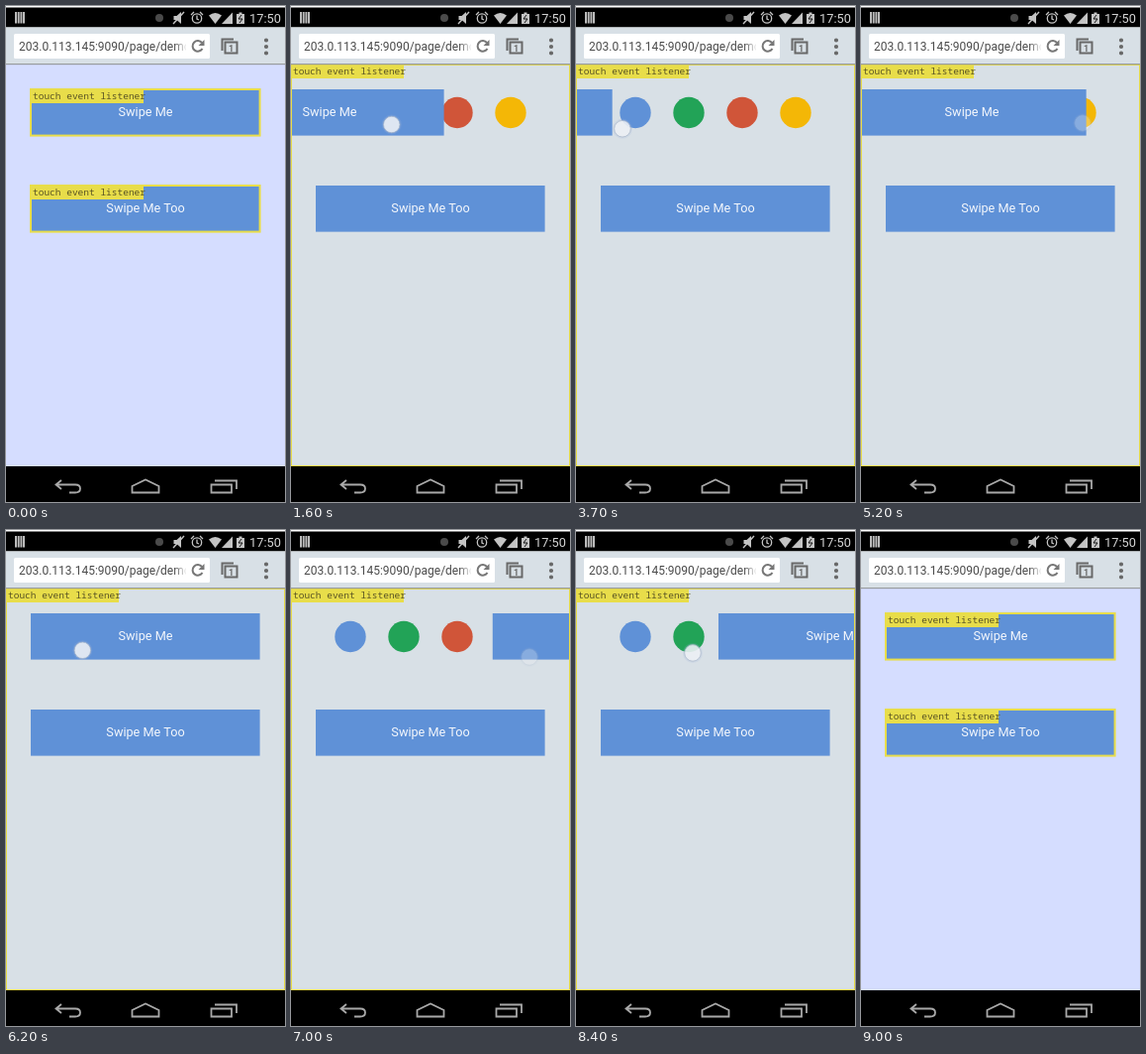
Recreate the animation shown at these times as an HTML page. Size 282 by 500 pixels, loop 9100 ms.

```html
<!DOCTYPE html>
<html lang="en">
<head>
<meta charset="utf-8">
<title>Swipe demo</title>
<style>
  html, body { margin: 0; width: 100%; height: 100%; overflow: hidden; background: #fff; }
  svg { display: block; width: 282px; height: 500px; }
  .ui { font-family: Roboto, sans-serif; }
  .button { font: 12.7px Roboto, sans-serif; fill: #f4f7fc; text-anchor: middle; }
  .label { font: 9.5px "Noto Sans Mono", monospace; fill: #5a5424; }
  .outline { fill: none; stroke: #e8dd4a; stroke-width: 2; }
  .nav { fill: none; stroke: #a9a9a9; stroke-width: 1.8; }
</style>
</head>
<body>
<svg viewBox="0 0 282 500">
  <defs>
    <clipPath id="page"><rect y="59" width="282" height="405"/></clipPath>
    <clipPath id="field"><rect x="8" y="28" width="174" height="25"/></clipPath>
    <linearGradient id="fade">
      <stop stop-color="#fff" stop-opacity="0"/><stop offset="1" stop-color="#fff"/>
    </linearGradient>
    <g id="listener">
      <rect width="114" height="14" fill="#e8dd4a"/>
      <text class="label" x="2" y="10">touch event listener</text>
    </g>
    <rect id="panel" x="25" width="231.6" height="46.6"/>
    <g id="highlight">
      <use href="#listener" x="25"/>
      <use href="#panel" class="outline"/>
    </g>
  </defs>

  <g clip-path="url(#page)">
    <rect id="backdrop" y="59" width="282" height="405"/>
    <g id="dots"></g>
    <g id="card">
      <use href="#panel" y="84" fill="#5f91d7"/>
      <use href="#highlight" y="84" class="idle"/>
      <text class="button" x="141" y="111.3">Swipe Me</text>
    </g>
    <use href="#panel" y="181" fill="#5f91d7"/>
    <use href="#highlight" y="181" class="idle"/>
    <text class="button" x="141" y="208.3">Swipe Me Too</text>
    <g id="active">
      <use href="#listener" y="59"/>
      <rect class="outline" x=".5" y="59.5" width="281" height="404" style="stroke-width:1"/>
    </g>
    <g id="finger">
      <circle r="10" fill="#9fb4dc" opacity=".2"/>
      <circle r="8.3" fill="#eff2f6" stroke="#aab6c8" stroke-width=".8" opacity=".87"/>
    </g>
  </g>

  <!-- status bar -->
  <rect y="1.5" width="282" height="20"/>
  <path d="M10 6v11.5M12.7 6v11.5M15.4 6v11.5M18 6v11.5" stroke="#bbb" stroke-width="2"/>
  <circle cx="155" cy="12" r="4" fill="#4a4a4a"/>
  <g fill="#c4c4c4">
    <path d="M169.5 10h3l4.5-4v12l-4.5-4h-3z"/>
    <path d="M169 18 180 6" stroke="#c4c4c4" stroke-width="1.4"/>
    <path d="M205 9.5Q211.5 4.5 218 9.5L211.5 18Z"/>
    <path d="M229 6.5V18H218z"/>
    <path d="M233 8h2.500V6.500h3V8H241v10h-8z"/>
  </g>
  <path d="M238 9 235 13h4l-3 4" fill="none" stroke="#111"/>
  <g fill="none" stroke="#c4c4c4" stroke-width="1.3">
    <circle cx="193" cy="12.5" r="4.7"/>
    <path d="M193 9.500v3.500l2 1M187 9l3-3M199 9l-3-3"/>
  </g>
  <text class="ui" x="246" y="17" font-size="12.8" fill="#d4d4d4">17:50</text>

  <!-- browser bar -->
  <rect y="21.5" width="282" height="37.5" fill="#d8e0e6"/>
  <rect y="58" width="282" height="1.2" fill="#999c9e"/>
  <rect x="8" y="28" width="198" height="25" rx="1.5" fill="#fff"/>
  <text class="ui" x="13" y="45" font-size="12" fill="#4a4a4a" clip-path="url(#field)">203.0.113.145:9090/page/demo</text>
  <rect x="170" y="30" width="13" height="21" fill="url(#fade)"/>
  <path d="M198 37A5.3 5.3 0 1 0 198.5 43" fill="none" stroke="#777" stroke-width="2"/>
  <path d="M200.5 34v6h-6z" fill="#777"/>
  <g fill="none" stroke="#686868" stroke-width="2">
    <path d="M218.5 45V33.5H230"/>
    <rect x="221.5" y="36.5" width="12" height="11"/>
  </g>
  <text class="ui" x="227.5" y="45.5" font-size="9" font-weight="700" text-anchor="middle" fill="#686868">1</text>
  <path d="M263 34.5v0M263 41v0M263 47.5v0" stroke="#686868" stroke-width="4.2" stroke-linecap="round"/>

  <!-- navigation bar -->
  <rect y="464" width="282" height="36"/>
  <g class="nav">
    <path d="M56 478l-5.5 4.5L56 487M51 482.5H70Q75 482.5 75 486.5T70 490.5H64"/>
    <path d="M127.5 490.5V484L141 477.5 154.5 484V490.5Z"/>
    <path d="M207.5 482.5H228V490.5H207.5ZM211 478.5H233V487"/>
  </g>
</svg>
<script>
const LOOP = 9100, STEP = 100, OPEN = 222;

// The finger drags from one point to another, then the card settles at rest
const swipes = [
  { start: 900, release: 2100, end: 2600, from: [229, 117], to: [25, 121], rest: -OPEN },
  { start: 3500, release: 5100, end: 5400, from: [39, 124], to: [224, 118], rest: 0 },
  { start: 6100, release: 6900, end: 7200, from: [70, 121], to: [241, 128], rest: OPEN },
  { start: 7900, release: 8800, end: 9000, from: [262, 121], to: [15, 126], rest: 0 }
];

const $ = id => document.getElementById(id);
const idle = document.querySelectorAll(".idle");
const show = (el, on) => { el.style.display = on ? "" : "none"; };
const mix = (a, b, u) => a + (b - a) * u;
const ease = (t, start, end) => {
  const u = Math.min(1, Math.max(0, (t - start) / (end - start)));
  return u * u * (3 - 2 * u);
};

$("dots").innerHTML = ["#5f91d7", "#22a357", "#d05539", "#f4b706"]
  .map((fill, i) => `<circle cx="${60 + 54 * i}" cy="107.5" r="15.7" fill="${fill}"/>`).join("");

function fingerAt({ start, release, from, to }, t) {
  const u = ease(t, start, release);
  return from.map((v, i) => mix(v, to[i], u));
}

// The card trails the finger by one step
function cardAt(t) {
  let rest = 0;
  for (const swipe of swipes) {
    if (t < swipe.start) break;
    const trail = Math.min(t, swipe.release) - STEP;
    const dragged = rest + fingerAt(swipe, trail)[0] - swipe.from[0];
    rest = mix(dragged, swipe.rest, ease(t, swipe.release, swipe.end));
  }
  return rest;
}

function draw(now) {
  const t = Math.floor(now % LOOP / STEP) * STEP;
  const swipe = swipes.find(s => t >= s.start && t < s.end);
  $("card").setAttribute("transform", `translate(${cardAt(t)})`);
  $("backdrop").setAttribute("fill", swipe ? "#d8e0e6" : "#d5ddff");
  idle.forEach(el => show(el, !swipe));
  show($("active"), swipe);
  show($("finger"), swipe);
  if (swipe) {
    $("finger").setAttribute("transform", `translate(${fingerAt(swipe, t)})`);
    $("finger").setAttribute("opacity", 1 - ease(t, swipe.release, swipe.release + 1.6 * STEP));
  }
}

const begin = performance.now();
function tick() {
  draw(performance.now() - begin);
  requestAnimationFrame(tick);
}
tick();
</script>
</body>
</html>
```
